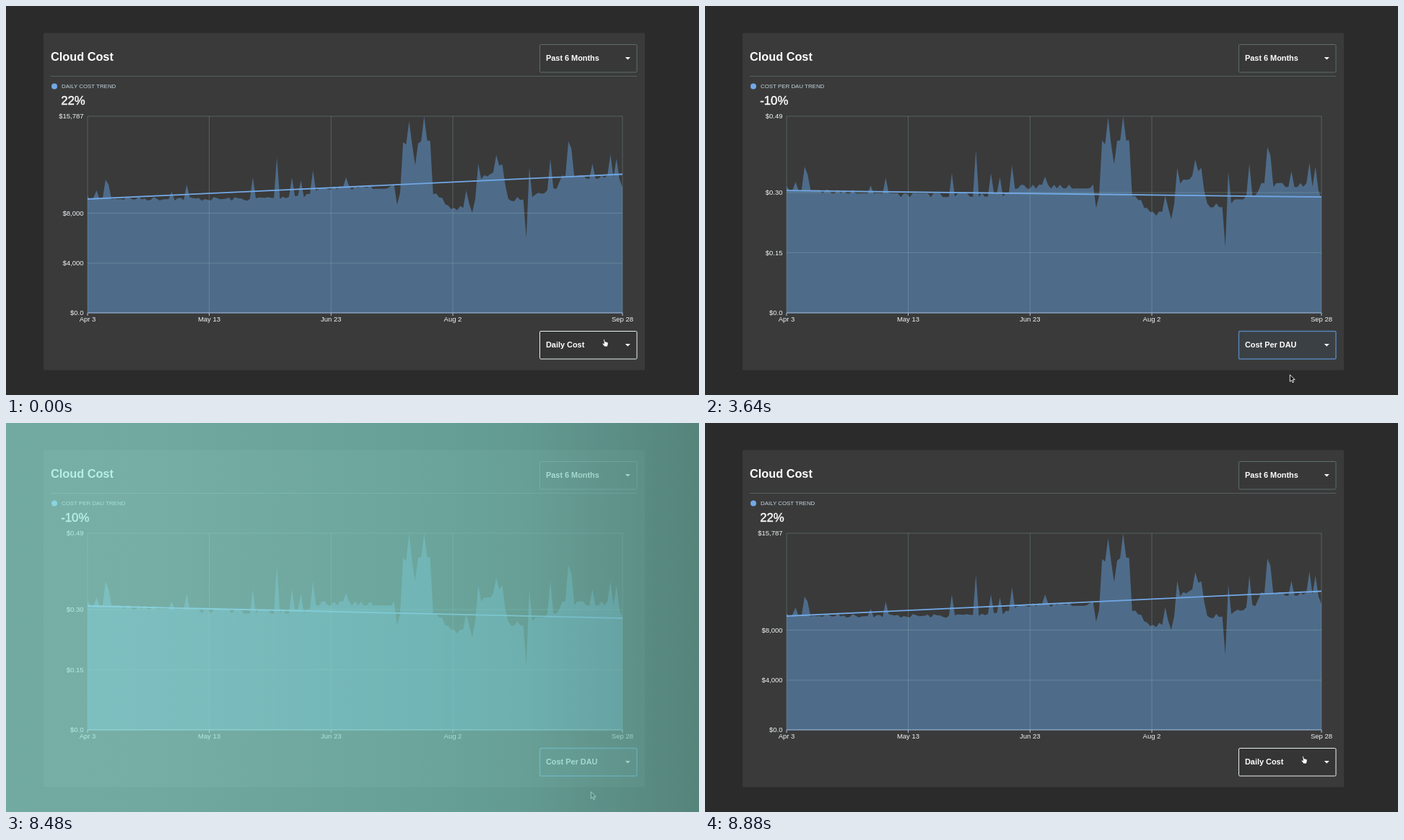
An HTML page for the animation above (8920 ms loop, 960 by 540 pixels).

```html
<!DOCTYPE html>
<html lang="en">
<head>
<meta charset="utf-8">
<title>Cloud Cost</title>
<style>
html, body { margin: 0; width: 100%; height: 100%; overflow: hidden; background: #2b2b2b; }
svg { display: block; width: 100%; height: 100%; }
text { font-family: "Liberation Sans", Arial, sans-serif; fill: #fff; }
.b { font-weight: 700; }
.ui { font-size: 10.9px; }
.axis { font-size: 9.5px; fill: #f0f4f6; }
.end { text-anchor: end; }
.mid { text-anchor: middle; }
.grid { stroke: #96b9be; stroke-opacity: .3; fill: none; }
</style>
</head>
<body>
<svg viewBox="0 0 960 540">
  <defs>
    <linearGradient id="mint">
      <stop offset="0" stop-color="#93ecdb"/>
      <stop offset=".2" stop-color="#90e9d8"/>
      <stop offset=".52" stop-color="#79deca"/>
      <stop offset=".74" stop-color="#66d5bf"/>
      <stop offset="1" stop-color="#3fae98"/>
    </linearGradient>
    <linearGradient id="pale">
      <stop offset="0" stop-color="#98e4e0"/>
      <stop offset=".6" stop-color="#a8d8d8"/>
      <stop offset="1" stop-color="#c3b4b9"/>
    </linearGradient>
    <filter id="shadow" x="-20%" y="-20%" width="140%" height="150%">
      <feDropShadow dx="0" dy="2" stdDeviation="3" flood-color="#000" flood-opacity=".35"/>
    </filter>
  </defs>
  <rect width="960" height="540" fill="#2b2b2b"/>
  <rect x="52" y="37.5" width="833" height="468" rx="1.5" fill="#3a3a3a"/>
  <text class="b" x="62" y="75.8" font-size="16.3">Cloud Cost</text>
  <rect x="739.5" y="53.5" width="134.5" height="38.5" rx="1.5" fill="#383838" stroke="#5f6d6d"/>
  <text class="b ui" x="748" y="76.4">Past 6 Months</text>
  <path d="M857.8 71h7l-3.5 3.6z" fill="#fff"/>
  <path d="M62 97.5H874" stroke="#566060"/>
  <circle cx="67" cy="111.5" r="4" fill="#72a8e6"/>
  <text id="legend" x="77" y="114.1" style="font-size:7.9px;fill:#c3d3dc"></text>
  <text id="change" x="76.2" y="137.3" font-size="16.8" stroke="#fff" stroke-width=".4"></text>

  <path id="area" fill="#4e6c8a"/>
  <path id="columns" class="grid"/>
  <path id="rows" class="grid"/>
  <path id="trend" stroke="#72a8e6" stroke-width="1.8" fill="none"/>
  <path id="axis" stroke="#a9c3e4" fill="none"/>
  <g id="labels"></g>

  <rect id="box" x="739.5" y="451.5" width="134.5" height="38.5" rx="1.5"/>
  <text id="choice" class="b ui" x="748" y="474.4"></text>
  <path d="M857.8 469h7l-3.5 3.6z" fill="#fff"/>

  <g id="menu">
    <rect x="739" y="451" width="135" height="81" rx="1" fill="#383838" filter="url(#shadow)"/>
    <rect x="739" y="451" width="135" height="38.5" fill="#4a5f74"/>
    <text class="ui" x="750" y="474.4">Daily Cost</text>
    <text class="ui" x="750" y="512.4">Cost Per DAU</text>
  </g>

  <path id="hand" fill="#fff" stroke="#222" stroke-width=".8" stroke-linejoin="round"
    d="M2.6 6.6L1.9 1.4Q2 .3 2.8.4Q3.6.5 3.7 1.4L4.2 4Q5.2 3.5 5.7 4.3Q6.7 3.9 7.1 4.7Q8.3 4.5 8.4 5.8L8.2 8.3L7.4 11H3.4L.6 7.6Q-.1 6.6.6 6.1Q1.3 5.8 2.6 6.6z"/>
  <path id="arrow" fill="#111" stroke="#fff" stroke-width=".9" stroke-linejoin="round"
    d="M810.3 511.8v9.6l2.2-2l1.5 3.3l1.6-.7l-1.5-3.3h3z"/>
  <g id="wash">
    <rect width="960" height="540" fill="url(#pale)"/>
    <rect id="tint" width="960" height="540" fill="url(#mint)"/>
  </g>
</svg>
<script>
const LOOP = 8920, OPEN = 1920, PICK = 2840, SWAP = 8600;
const X0 = 113, X1 = 854, TOP = 153, BASE = 426, DAYS = 178;
const $ = id => document.getElementById(id);
const set = (id, name, value) => $(id).setAttribute(name, value);
const clamp = v => Math.max(0, Math.min(1, v));
const mix = (a, b, k) => a + (b - a) * k;
const span = (t, from, to) => clamp((t - from) / (to - from));
const smooth = k => k * k * (3 - 2 * k);

function along(points, x) {
  const j = Math.max(1, points.findIndex(p => p[0] >= x));
  const [a, b] = [points[j - 1], points[j]];
  return mix(a[1], b[1], (x - a[0]) / (b[0] - a[0]));
}

// cubic-bezier(.25, .1, .25, 1)
function ease(x) {
  const bez = (s, p, q) => 3 * s * (1 - s) * (1 - s) * p + 3 * s * s * (1 - s) * q + s * s * s;
  let lo = 0, hi = 1;
  for (let n = 0; n < 24; n++) {
    const m = (lo + hi) / 2;
    if (bez(m, .25, .25) < x) lo = m; else hi = m;
  }
  return bez(hi, .1, 1);
}

let seed = 7;
const jitter = size => {
  seed = (seed * 16807) % 2147483647;
  return (seed / 2147483647 * 2 - 1) * size;
};

// Daily cost as (day, y): a broad level with small noise, and single-day spikes.
const level = [[0, 267], [54, 268], [72, 263], [78, 253], [102, 251], [104, 262], [105, 192], [114, 188],
  [115, 259], [122, 283], [129, 270], [131, 240], [138, 222], [140, 270], [147, 265], [156, 252],
  [158, 236], [178, 238]];
const spikes = new Map([[3, 256], [6, 241], [7, 248], [28, 258], [33, 248], [55, 238], [63, 210], [68, 238],
  [71, 242], [75, 228], [86, 238], [103, 276], [107, 160], [109, 221], [112, 153], [126, 256], [128, 287],
  [130, 219], [136, 207], [146, 322], [147, 224], [154, 212], [160, 188], [161, 198], [168, 219],
  [174, 206], [176, 212], [178, 252]]);
const daily = Array.from({ length: DAYS + 1 }, (_, i) => {
  const calm = along(level, i) + jitter(3);
  return spikes.get(i) ?? calm;
});

// Cost per user: scaled by a growing user base, rounded to whole cents.
const cent = (BASE - TOP) / 49;
const perUser = daily.map((y, i) => {
  const h = BASE - y;
  const cents = Math.round((h * mix(1.1, .905, i / DAYS) + .1 * (h - 170)) / cent);
  return BASE - Math.min(49, cents) * cent;
});

const views = [
  { name: "Daily Cost", change: "22%", ticks: [["$15,787", 153], ["$8,000", 287.5], ["$4,000", 357]],
    box: { fill: "#353535", stroke: "#e9f1f3", "stroke-width": 1 } },
  { name: "Cost Per DAU", change: "-10%", ticks: [["$0.49", 153], ["$0.30", 259], ["$0.15", 342.5]],
    box: { fill: "#3b4044", stroke: "#5585bb", "stroke-width": 1.4 } }
];
const dates = [["Apr 3", X0], ["May 13", 281.5], ["Jun 23", 450.3], ["Aug 2", 619], ["Sep 28", X1]];
const label = (s, x, y, align) => `<text class="axis ${align}" x="${x}" y="${y}">${s}</text>`;

set("columns", "d", dates.map(([, x]) => `M${x} ${TOP}V${BASE}`).join("") + `M${X0} ${TOP}H${X1}`);
set("axis", "d", `M${X0} ${BASE}H${X1}` + dates.map(([, x]) => `M${x} ${BASE}v4`).join(""));

let shown = -1;
function showView(n) {
  if (n === shown) return;
  shown = n;
  const v = views[n];
  $("legend").textContent = v.name.toUpperCase() + " TREND";
  $("change").textContent = v.change;
  $("choice").textContent = v.name;
  set("rows", "d", v.ticks.slice(1).map(([, y]) => `M${X0} ${y}H${X1}`).join(""));
  $("labels").innerHTML =
    [...v.ticks, ["$0.0", BASE]].map(([s, y]) => label(s, 107.5, y + 3.4, "end")).join("") +
    dates.map(([s, x]) => label(s, x, 438, "mid")).join("");
  for (const name in v.box) set("box", name, v.box[name]);
}

let drawn = -1;
function drawChart(k) {
  if (k === drawn) return;
  drawn = k;
  const line = daily.map((y, i) =>
    `L${mix(X0, X1, i / DAYS).toFixed(2)} ${mix(y, perUser[i], k).toFixed(2)}`).join("");
  set("area", "d", `M${X0} ${BASE}${line}V${BASE}Z`);
  set("trend", "d", `M${X0} ${mix(268, 254, k)}L${X1} ${mix(233.5, 271, k)}`);
}

function render(t) {
  const picked = t >= PICK && t < SWAP;
  showView(picked ? 1 : 0);
  drawChart(picked ? ease(span(t, PICK - 20, PICK + 1480)) : 0);

  const grow = 1 - (1 - span(t, OPEN - 20, OPEN + 240)) ** 3;
  set("menu", "opacity", t < PICK ? grow : 1 - span(t, PICK - 40, PICK + 200));
  set("menu", "transform",
    `translate(806 470) scale(${mix(.75, 1, grow)} ${mix(.5625, 1, grow)}) translate(-806 -470)`);

  const pointing = t < PICK + 120 || t >= SWAP;
  const go = t < SWAP ? smooth(span(t, 2080, 2760)) : 0;
  set("hand", "transform", `translate(${mix(825.8, 808.3, go)} ${mix(462, 507, go)})`);
  set("hand", "opacity", pointing ? 1 : 0);
  set("arrow", "opacity", pointing ? 0 : 1);

  const wash = t < SWAP
    ? 1 - (1 - span(t, 8320, SWAP)) ** 1.3
    : 1 - span(t, SWAP, 8880) ** 1.8;
  set("wash", "opacity", wash);
  set("tint", "opacity", wash);
}

const start = performance.now();
function tick() {
  render((performance.now() - start) % LOOP);
  requestAnimationFrame(tick);
}
tick();
</script>
</body>
</html>
```
